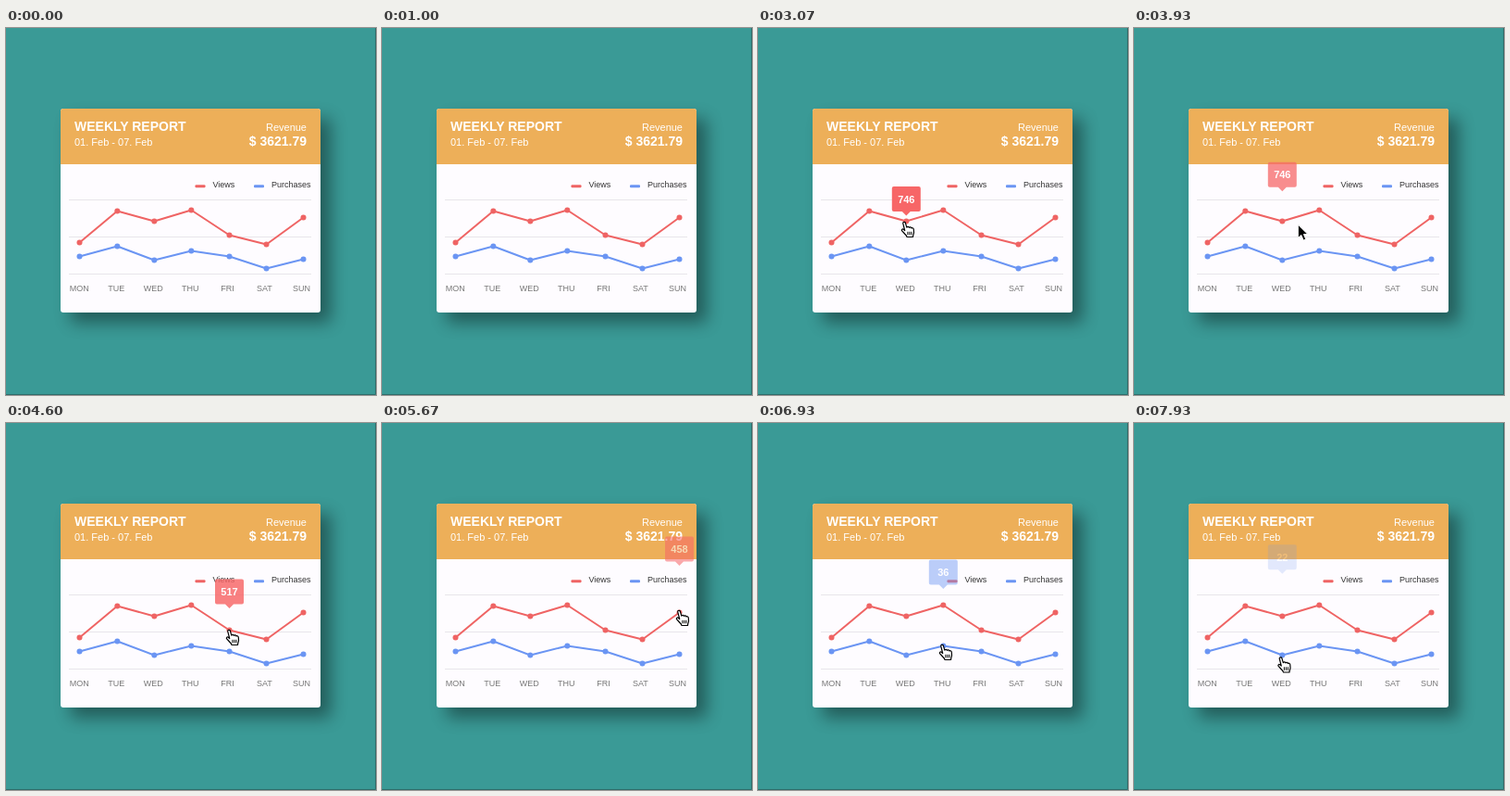
An HTML page for the animation above (8000 ms loop, 400 by 396 pixels).

```html
<!DOCTYPE html>
<html lang="en">
<head>
<meta charset="utf-8">
<title>Weekly report</title>
<style>
  html, body { margin: 0; width: 100%; height: 100%; overflow: hidden; background: #3a9a96; }
  svg { display: block; width: 400px; height: 396px; font-family: "Liberation Sans", Arial, sans-serif; }
  .shadow { fill: #000; opacity: .4; filter: blur(9px); }
  .head { fill: #fff; font-size: 11px; }
  .strong { font-size: 14px; font-weight: bold; }
  .legend { fill: #333; font-size: 9px; }
  .days { fill: #777; font-size: 9px; text-anchor: middle; }
  .grid { stroke: #e8e6ea; }
  .line { fill: none; stroke-width: 2; stroke-linejoin: round; }
  .tip text { fill: #fff; font-size: 11px; font-weight: bold; text-anchor: middle; }
  .end { text-anchor: end; }
</style>
</head>
<body>
<svg viewBox="0 0 400 396">
  <rect width="400" height="396" fill="#3a9a96"/>
  <path d="M399.5 0V395.5H0" fill="none" stroke="#2d6d6a"/>
  <rect class="shadow" x="70" y="98" width="281" height="220" rx="3"/>
  <rect x="59" y="87" width="281" height="220" rx="3" fill="#fefcff"/>
  <path d="M59 147V90a3 3 0 0 1 3-3H337a3 3 0 0 1 3 3V147Z" fill="#edaf59"/>
  <g class="head">
    <text class="strong" x="74" y="111">WEEKLY REPORT</text>
    <text x="74" y="127">01. Feb - 07. Feb</text>
    <text class="end" x="325" y="111">Revenue</text>
    <text class="strong end" x="325" y="127">$ 3621.79</text>
  </g>
  <g class="legend">
    <rect x="204.500" y="169.300" width="11" height="3" rx="1" fill="#ef6464"/>
    <text x="223.500" y="171.500">Views</text>
    <rect x="268" y="169.300" width="11" height="3" rx="1" fill="#6b95f3"/>
    <text x="287" y="171.500">Purchases</text>
  </g>
  <path class="grid" d="M68 185.500H330M68 225.500H330M68 265.500H330"/>
  <g class="days" id="days"></g>
  <g id="chart"></g>
  <g id="tips"></g>
  <g id="cursor" visibility="hidden">
    <path id="arrow" d="M0 0V14.500L3.400 11.400L5.900 17L8.500 15.900L6.100 10.500H10.600Z"
      fill="#000" stroke="#fff" stroke-linejoin="round"/>
    <g id="hand" transform="translate(-4.500 -.5)" stroke="#000" stroke-width="1.200" stroke-linejoin="round">
      <path fill="#fff" d="M2.200 2.200C2 .8 4.400 .3 4.900 1.800L6.300 6.600C7 5.600 8.600 5.800 8.900 6.900
        C9.700 6 11.100 6.400 11.400 7.500C12.600 6.800 13.700 7.600 13.800 8.800L14 12C14 13.600 13 14.600 13 17
        H6.500C6.300 15.400 4.600 14.200 3.600 13L1.200 10.400C.2 9.200 1.600 7.900 2.800 8.800L4.200 10Z"/>
      <path d="M7.400 11.300V14.800M9.400 11.300V14.800M11.400 11.300V14.800" stroke-width="1"/>
    </g>
  </g>
</svg>
<script>
  const LOOP = 8000, FADE = 300, DROP = 100;
  const $ = id => document.getElementById(id);
  const dayX = [79.5, 120.3, 160.3, 200.3, 241.5, 281.5, 321.5];
  const series = {
    views: { color: "#ef6464", tip: "#f76667", y: [231.5, 197.5, 208.5, 196.5, 223.5, 233.5, 204.5] },
    purchases: { color: "#6b95f3", tip: "#6b95f3", y: [246.5, 235.5, 250.5, 240.5, 246.5, 259.5, 249.5] }
  };

  // Hovered points: [series, day index, value, hover start, hover end]
  const hovers = [
    ["views", 2, 746, 2070, 3830],
    ["views", 4, 517, 4381, 5010],
    ["views", 6, 458, 5510, 6180],
    ["purchases", 3, 36, 6792, 7380],
    ["purchases", 2, 22, 7849, 9000]
  ];

  // Pointer moves: [start, end, from, to]
  const moves = [
    [1360, 2160, [61, 279], [159, 209]],
    [3700, 4460, [159, 209], [242, 223]],
    [4880, 5600, [242, 223], [322, 202]],
    [6050, 6870, [322, 202], [200, 239]],
    [7250, 7930, [200, 239], [159.5, 252.5]]
  ];

  const smooth = (t, start, end) => {
    const u = Math.min(1, Math.max(0, (t - start) / (end - start)));
    return u * u * (3 - 2 * u);
  };
  const show = (el, on) => el.setAttribute("visibility", on ? "visible" : "hidden");

  $("days").innerHTML = ["MON", "TUE", "WED", "THU", "FRI", "SAT", "SUN"]
    .map((day, i) => `<text x="${79.2 + i * 40.05}" y="283.500">${day}</text>`).join("");

  $("chart").innerHTML = Object.values(series).map(({ color, y }) =>
    `<polyline class="line" stroke="${color}" points="${y.map((v, i) => dayX[i] + "," + v).join(" ")}"/>` +
    y.map((v, i) => `<circle cx="${dayX[i]}" cy="${v}" r="3" fill="${color}"/>`).join("")
  ).join("");

  $("tips").innerHTML = hovers.map(([name, , value]) =>
    `<g class="tip" opacity="0">
      <path fill="${series[name].tip}" d="M-13.500 -37.500h27a2 2 0 0 1 2 2v23a2 2 0 0 1 -2 2H4.500L0 -6L-4.500 -10.500H-13.500a-2 -2 0 0 1 -2 -2v-23a2 2 0 0 1 2 -2Z"/>
      <text y="-20">${value}</text>
    </g>`).join("");
  const tips = [...$("tips").children];

  function draw(t) {
    hovers.forEach(([name, day, , start, end], i) => {
      const shown = smooth(t, start, start + FADE) - smooth(t, end, end + FADE);
      const y = series[name].y[day] - DROP * (1 - shown);
      tips[i].setAttribute("transform", `translate(${dayX[day]} ${y})`);
      tips[i].setAttribute("opacity", shown);
    });

    const move = moves.filter(m => t >= m[0]).pop();
    show($("cursor"), move);
    const hovering = hovers.some(h => t >= h[3] && t < h[4]);
    show($("hand"), move && hovering);
    show($("arrow"), move && !hovering);
    if (!move) return;
    const [start, end, from, to] = move;
    const k = smooth(t, start, end);
    const [x, y] = from.map((v, i) => v + (to[i] - v) * k);
    $("cursor").setAttribute("transform", `translate(${x} ${y})`);
  }

  const origin = performance.now();
  function frame() {
    draw((performance.now() - origin) % LOOP);
    requestAnimationFrame(frame);
  }
  frame();
</script>
</body>
</html>
```
